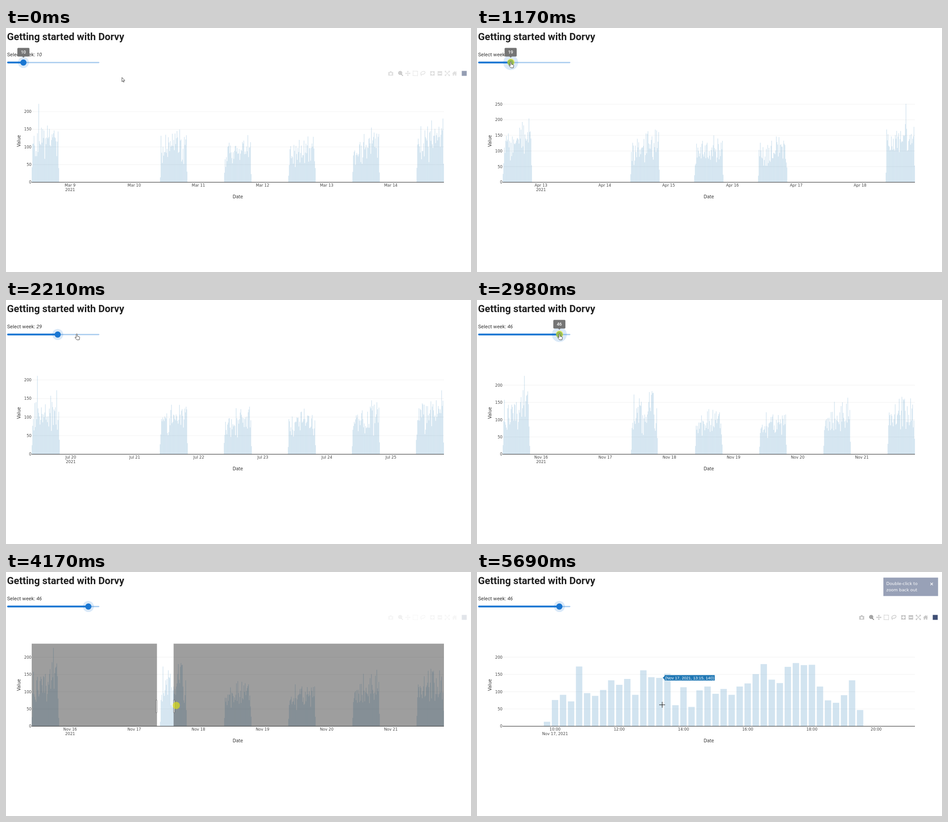
Animation of 1031x543 px, one loop 6.35 s. Source, as an HTML page with a canvas:

```html
<!DOCTYPE html>
<html lang="en">
<head>
<meta charset="utf-8">
<title>Week chart</title>
<style>
html, body { margin: 0; width: 100%; height: 100%; overflow: hidden; background: #fff; }
canvas { display: block; }
</style>
</head>
<body>
<canvas id="stage" width="1031" height="543"></canvas>
<script>
const c = document.getElementById('stage').getContext('2d');
const LOOP = 6350, LEFT = 57, RIGHT = 971, TOP = 159.5, BASE = 343.3;
const SANS = '"DejaVu Sans", Verdana, sans-serif', ROBOTO = 'Roboto, sans-serif';
const BLUE = '#1976d2';

// Highest value, its day and bar; opening hours count in quarters
const weeks = {
  10: { peak: 222, day: 0, bar: 10 },
  15: { peak: 251, day: 5, bar: 30, close: 82.5, shut: 4 },
  29: { peak: 211, day: 0, bar: 8, open: 37.5 },
  46: { peak: 227, day: 0, bar: 32 }
};
const nov17 = [13, 76, 91, 72, 173, 96, 88, 105, 133, 120, 137, 91, 162, 142, 140, 152, 61, 113, 56, 104,
  115, 94, 108, 91, 115, 124, 151, 180, 135, 125, 172, 183, 177, 178, 115, 75, 68, 90, 133, 47];

const icons = [
  [853, 'M-5.5-3h3l1-2h3l1 2h3v8h-11zM2.5 1a2.5 2.5 0 1 0-5 0a2.5 2.5 0 1 0 5 0'],
  [874.5, 'M3-1a3.5 3.5 0 1 0-7 0a3.5 3.5 0 1 0 7 0M2 2l3.5 3.5M-2.5-1h4M-.5-3v4', 1.7],
  [891, 'M-5 0h10M0-5v10M-1.5-3.5l1.5-1.5l1.5 1.5M-1.5 3.5l1.5 1.5l1.5-1.5M-3.5-1.5l-1.5 1.5l1.5 1.5M3.5-1.5l1.5 1.5l-1.5 1.5', 1.3],
  [907.5, 'M-5-5h10v10h-10z', 1.4, [2, 1.3]],
  [924, 'M-3.5 2.5C-7-1-1-5 3-4.5S5 2 0 2S-4.5 1.5-4 3S-2 4.5-3.5 5.5', 1.3],
  [945.5, 'M-5-5h10v10h-10zM-3.5-1v2h2.5v2.5h2v-2.5h2.5v-2h-2.5v-2.5h-2v2.5z'],
  [962, 'M-5-5h10v10h-10zM-3.5-1v2h7v-2z'],
  [978.5, 'M-4-4l8 8M4-4l-8 8M-5-2.5v-2.5h2.5M5-2.5v-2.5h-2.5M-5 2.5v2.5h2.5M5 2.5v2.5h-2.5', 1.4],
  [994.5, 'M-5.5.5L0-5l2.5 2.5v-2h1.5v3.5l1.5 1.5h-1.5v4.5h-3v-3h-2v3h-3v-4.5z']
].map(([x, d, width, dash = []]) => ({ x, path: new Path2D(d), width, dash }));
const arrow = new Path2D('M0 0v9.5l2.2-2l1.4 3l1.4-.6l-1.4-3h3z');
const hand = new Path2D('M-1.3 0q1.3-1.8 2.4 0v4.5l4 1q1.5.5 1.2 2.5l-1 4.5h-5.3l-4-5q0-1.5 1.5-1l1.2 1.3z');

function rand(w, d, i) {
  const s = Math.sin(w * 12.9898 + d * 78.233 + i * 37.719) * 43758.5453;
  return s - Math.floor(s);
}

// Linear interpolation through [time, value] points
function key(t, points) {
  if (t <= points[0][0]) return points[0][1];
  for (let i = 1; i < points.length; i++) {
    const [t0, a] = points[i - 1], [t1, b] = points[i];
    if (t < t1) return a + (b - a) * (t - t0) / (t1 - t0);
  }
  return points[points.length - 1][1];
}

const cursorX = t => key(t, [[70, 257], [330, 128], [690, 43], [890, 43], [1170, 75], [1650, 115], [1780, 115],
  [2210, 157], [2850, 183], [3080, 183], [3970, 343], [4030, 343], [4170, 377.5], [4660, 410.5]]);
const cursorY = t => key(t, [[70, 110], [330, 97], [690, 80], [890, 79], [1170, 76.2], [3080, 76.2],
  [3970, 298.5], [4030, 298.5], [4170, 297], [4660, 296.5], [5480, 296.5], [5550, 295.5]]);
const toolAlpha = t => key(t, [[70, .55], [420, 0], [3150, 0], [3550, .8], [4030, .8], [4170, .15],
  [4980, .1], [4990, .27], [5480, .3], [5690, 1]]);
const sliding = t => t >= 890 && t < 1700 || t >= 2280 && t < 3000;
const zooming = t => t >= 4060 && t < 4985;

function weekAt(t) {
  const step = 890 + Math.floor((t - 889) / 70) * 70;
  return Math.round(key(step, [[890, 10], [1170, 19], [1650, 29], [2270, 29], [2280, 40], [2850, 46]]));
}

// Busy at both ends of the week, quieter between, slightly rising through each day
function barValue(w, week, d, i, n) {
  if (w === 46 && d === 1) return nov17[i] || 0;
  if (d === week.day && i === week.bar) return week.peak;
  const level = (120 - 32 * Math.sin(Math.PI * d / 5)) * (.9 + .2 * i / n) * week.peak / 225;
  const edge = i === 0 || i === n - 1 ? .3 : 1;
  return level * edge * (.45 + .55 * (rand(w, d, i) + rand(w, d, i + 99)));
}

function rect(x, y, w, h, fill) {
  c.fillStyle = fill;
  c.fillRect(x, y, w, h);
}

function disc(x, y, r, fill) {
  c.fillStyle = fill;
  c.beginPath();
  c.arc(x, y, r, 0, 7);
  c.fill();
}

function box(x, y, w, h, r, fill) {
  c.fillStyle = fill;
  c.beginPath();
  c.roundRect(x, y, w, h, r);
  c.fill();
}

function text(s, x, y, font, fill = '#444', align = 'left', spacing = 0) {
  c.font = font;
  c.fillStyle = fill;
  c.textAlign = align;
  c.letterSpacing = spacing + 'px';
  c.fillText(s, x, y);
}

const tickText = (s, x, y = 352.5, align = 'center') => text(s, x, y, '8.5px ' + SANS, '#444', align);

function yAxis(max) {
  const scale = 174.5 / max;
  for (let v = 0; v <= max; v += 50) {
    const y = BASE - v * scale;
    if (v) rect(LEFT, y - .4, RIGHT - LEFT, .8, '#eee');
    tickText(v, 56.5, y + 3.1, 'right');
  }
  return scale;
}

const bar = (x, w, h) => rect(x - w / 2, BASE - h, w, h, 'rgba(31,119,180,.2)');

function weekChart(w) {
  const week = { peak: 215, day: w % 6, bar: w % 40, open: 38.5, close: 79.5, ...weeks[w] };
  const scale = yAxis(week.peak);
  const quarter = (RIGHT - LEFT) / (6 * 96 + week.close - week.open);
  const xAt = (day, q) => LEFT + (day * 96 + q - week.open) * quarter;
  const n = Math.round(week.close - week.open);
  for (let d = 0; d < 6; d++) {
    const day = d && d + 1;  // closed on Tuesdays
    if (d === week.shut) continue;
    for (let i = 0; i < n; i++)
      bar(xAt(day, week.open + .5 + i), quarter * .92, barValue(w, week, d, i, n) * scale);
  }
  for (let day = 1; day <= 6; day++) {
    const date = new Date(Date.UTC(2021, 0, 4 + (w - 1) * 7 + day));
    tickText(date.toLocaleDateString('en-US', { month: 'short', day: 'numeric', timeZone: 'UTC' }), xAt(day, 0));
  }
  tickText('2021', xAt(1, 0), 363.2);
}

function dayChart() {
  const scale = yAxis(weeks[46].peak);
  nov17.forEach((v, i) => bar(155.2 + i * 17.8, 14.2, v * scale));
  for (let k = 0; k < 6; k++) tickText(10 + 2 * k + ':00', 173 + k * 142.4);
  tickText('Nov 17, 2021', 173, 363.2);
}

function zoomBox(t) {
  const x0 = 334.7, x1 = key(t, [[4030, 343], [4170, 371.5], [4240, 378], [4660, 410.8]]);
  const shade = `rgba(0,0,0,${key(t, [[4060, 0], [4170, .38]])})`;
  rect(LEFT, TOP, x0 - LEFT, BASE - TOP, shade);
  rect(x1, TOP, RIGHT - x1, BASE - TOP, shade);
  c.strokeStyle = '#444';
  c.lineWidth = .8;
  for (const x of [x0 - 1.2, x1 + 1.2]) {
    box(x - 1.2, 285, 2.4, 28, .5, '#fff');
    c.stroke();
  }
}

function hoverLabel(i, time) {
  const x = 162.3 + i * 17.8, y = BASE - nov17[i] * .77;
  c.fillStyle = '#1f77b4';
  c.strokeStyle = '#fff';
  c.lineWidth = .8;
  c.beginPath();
  c.moveTo(x, y);
  for (const [dx, dy] of [[4, -4], [4, -6.5], [116, -6.5], [116, 6.5], [4, 6.5], [4, 4]]) c.lineTo(x + dx, y + dy);
  c.closePath();
  c.fill();
  c.stroke();
  text(`(Nov 17, 2021, ${time}, ${nov17[i]})`, x + 5.5, y + 3.1, '9.1px "Liberation Sans", Arial, sans-serif', '#fff');
}

function toolbar(alpha) {
  c.globalAlpha = alpha;
  icons.forEach((icon, i) => {
    c.save();
    c.translate(icon.x, 101);
    c.fillStyle = c.strokeStyle = i === 1 ? 'rgba(68,68,68,.7)' : 'rgba(68,68,68,.3)';
    if (icon.width) {
      c.lineWidth = icon.width;
      c.setLineDash(icon.dash);
      c.stroke(icon.path);
    } else c.fill(icon.path, 'evenodd');
    c.restore();
  });
  rect(1010.5, 95.5, 11, 11, '#3f4f75');
  c.globalAlpha = 1;
}

function slider(t) {
  const w = weekAt(t), x = 2.6 + (w - 1) * 4, y = 76.8;
  box(2.5, y - 1.4, 204.5, 2.8, 1.4, '#a8cbee');
  box(2.5, y - 2, x - 2.5, 4, 2, BLUE);
  disc(x, y, sliding(t) ? 16.6 : 12.3, 'rgba(25,118,210,.16)');
  disc(x, y, 6.9, BLUE);
  if (t < 1750 || t >= 2250 && t < 3150) {
    box(x - 13.4, 44.2, 26.8, 19.2, 2, '#757575');
    c.beginPath();
    c.moveTo(x - 3, 63);
    c.lineTo(x + 3, 63);
    c.lineTo(x, 66);
    c.fill();
    text(w, x, 57.3, '500 9.8px ' + ROBOTO, '#fff', 'center', .1);
  }
}

function notice(alpha) {
  c.globalAlpha = alpha;
  rect(901, 12.5, 121.3, 41, '#98a1b7');
  const font = '9.3px ' + SANS;
  text('Double-click to', 907.5, 29.3, font, '#fff');
  text('zoom back out', 907.5, 43.3, font, '#fff');
  text('×', 1008, 29.5, 'bold 11px ' + SANS, '#fff', 'center');
  c.globalAlpha = 1;
}

function pointer(t) {
  const x = cursorX(t), y = cursorY(t);
  if (sliding(t) || zooming(t) || t >= 4000 && t < 4060) disc(x, y, 8, 'rgba(234,234,0,.6)');
  if (zooming(t)) return;
  c.save();
  c.translate(x, y);
  if (y < TOP) {
    const shape = y < 88 ? hand : arrow;
    c.fillStyle = '#fff';
    c.strokeStyle = '#333';
    c.lineWidth = .9;
    c.fill(shape);
    c.stroke(shape);
  } else {
    rect(-6.5, -.5, 13, 1.1, '#222');
    rect(-.5, -6.5, 1.1, 13, '#222');
  }
  c.restore();
}

function draw(t) {
  const zoomed = t >= 4985;
  const shown = weekAt(t - 130);
  rect(0, 0, 1031, 543, '#fff');
  text('Getting started with Dorvy', 2.3, 27.4, 'bold 22.1px ' + ROBOTO, '#212121');
  text('Select week: ', 2.4, 62.6, '11px ' + ROBOTO, '#333', 'left', .1);
  text(shown, 67.5, 62.6, 'italic 11px ' + ROBOTO, '#333', 'left', .1);
  slider(t);
  toolbar(toolAlpha(t));

  if (zoomed) dayChart();
  else weekChart(shown);
  if (zooming(t)) zoomBox(t);
  rect(LEFT, BASE - .6, RIGHT - LEFT, 1.2, '#444');
  text('Date', 514, 378.7, '9.7px ' + SANS, '#333', 'center');
  c.save();
  c.translate(31.8, 251.3);
  c.rotate(-Math.PI / 2);
  text('Value', 0, 0, '9.7px ' + SANS, '#333', 'center');
  c.restore();

  if (zoomed && t < 5130) hoverLabel(10, '12:15');
  if (t >= 5550) hoverLabel(14, '13:15');
  notice(key(t, [[5000, 0], [5410, .9], [5550, .9], [5690, 1]]));
  pointer(t);
}

const begin = performance.now();
function loop() {
  draw((performance.now() - begin) % LOOP);
  requestAnimationFrame(loop);
}
loop();
</script>
</body>
</html>
```
